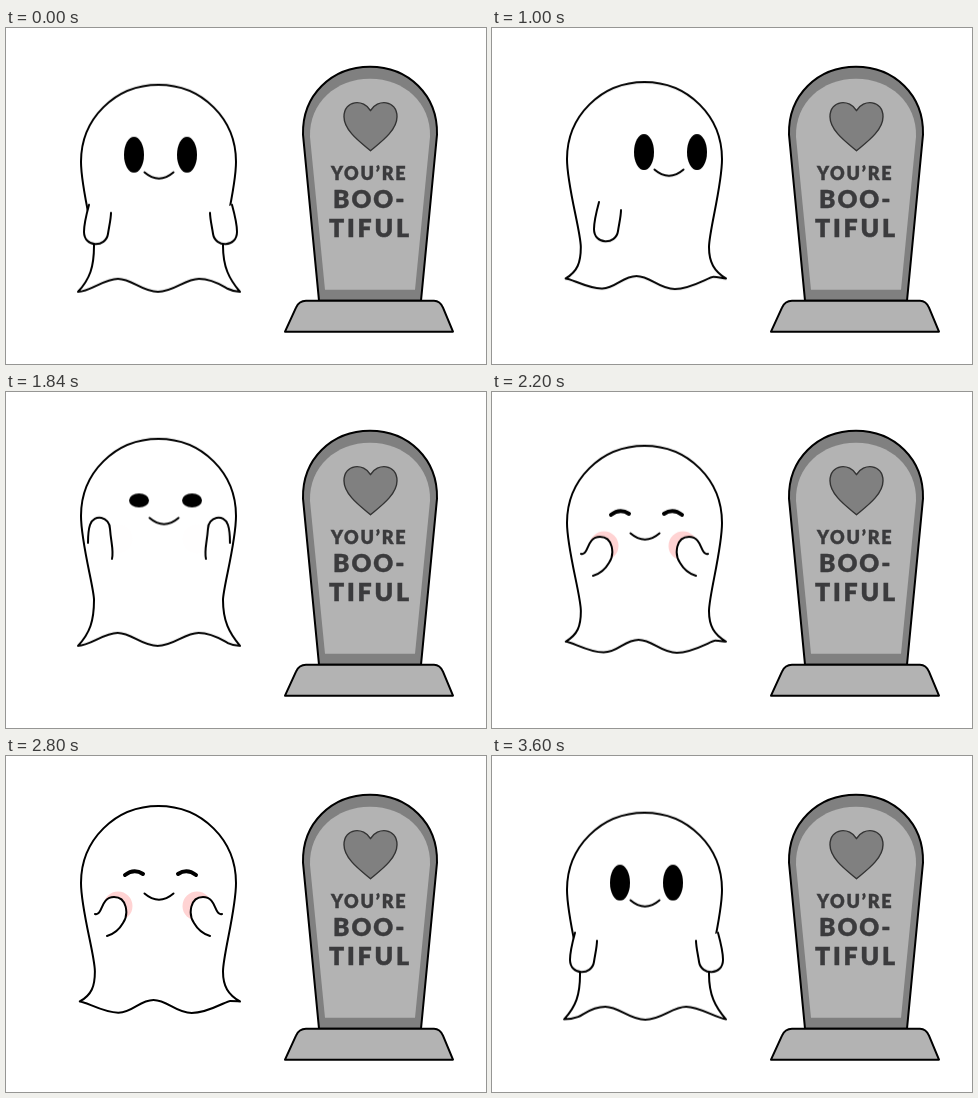
Write an HTML page without scripts that moves like this. It is 480 px wide and 336 px high and loops after 3.64 s.

```html
<!DOCTYPE html>
<html lang="en">
<head>
<meta charset="utf-8">
<title>Boo-tiful ghost</title>
<style>
  html, body { margin: 0; width: 100%; height: 100%; overflow: hidden; background: #fff; }
  svg { display: block; width: 480px; height: 336px; }
  .line { fill: none; stroke: #000; stroke-width: 2; stroke-linecap: round; }
  .skin { fill: #fff; stroke: #000; stroke-width: 2; stroke-linejoin: round; stroke-linecap: round; }
  .stone { stroke: #000; stroke-width: 2; stroke-linejoin: round; }
  text { font-family: Lato, sans-serif; font-weight: 900; fill: #3b3b3d; stroke: #3b3b3d; stroke-width: .4; }

  .ghost { animation: bob 1213.333ms infinite; }
  .body { animation: hem 606.667ms ease-in-out infinite; }
  .face, .left, .right, .arm, .eye, .open, .happy, .blush, .front, .back {
    animation-duration: 3640ms;
    animation-iteration-count: infinite;
    animation-timing-function: ease-in-out;
  }
  .face { animation-name: look; }
  .left { animation-name: left; }
  .right { animation-name: right; }
  .arm { animation-name: arm; }
  .eye { animation-name: blink; }
  .eye, .happy { transform-box: fill-box; transform-origin: center; }
  .open { animation-name: open; animation-timing-function: step-end; }
  .happy { animation-name: happy; animation-timing-function: step-end; stroke-width: 4; }
  .blush { animation-name: blush; }
  .front { animation-name: front; animation-timing-function: step-end; }
  .back { animation-name: back; animation-timing-function: step-end; }

  @keyframes bob {
    0%, 100% { transform: translateY(0); animation-timing-function: cubic-bezier(.37, 0, .63, 1); }
    50% { transform: translateY(-10px); animation-timing-function: cubic-bezier(.37, 0, .63, 1); }
  }

  /* The hem ripples leftwards; each half cycle hands its nodes on by one. */
  @keyframes hem {
    0% { d: path("M72 263C84 250 88 238 88 217C88 205 75 160 75 133C75 90 109 56 152.5 56S230 90 230 133C230 160 217 205 217 217C217 238 223 250 234 263C230 263 226 262 222 260S207 250 193 250S168 263 152 263S126 250 112 250S84 263 72 263Z"); }
    50% { d: path("M74 250C86 244 89 236 89 222C89 205 75 160 75 133C75 90 109 56 152.5 56S230 90 230 133C230 160 217 205 217 222C217 236 222 244 234 250C222 250 206 263 190 263S166 250 152 250S132 263 116 263S88 254 82 252S76 250 74 250Z"); }
    50.01% { d: path("M74 250C86 244 89 236 89 222C89 205 75 160 75 133C75 90 109 56 152.5 56S230 90 230 133C230 160 217 205 217 222C217 236 222 244 234 250C232 250 230 251 228 251S206 263 190 263S166 250 152 250S132 263 116 263S80 250 74 250Z"); }
    100% { d: path("M72 263C84 250 88 238 88 217C88 205 75 160 75 133C75 90 109 56 152.5 56S230 90 230 133C230 160 217 205 217 217C217 238 223 250 234 263C222 261 207 250 193 250S168 263 152 263S126 250 112 250S90 258 85 260S76 263 72 263Z"); }
  }

  @keyframes look {
    0%, 11% { transform: translate(0, 0); animation-timing-function: ease-in; }
    15.4% { transform: translate(12px, 5px); animation-timing-function: ease-out; }
    19.8%, 34% { transform: translate(24px, 0); }
    40.7%, 46.7% { transform: translate(12px, -20px); }
    53.8%, 100% { transform: translate(0, 0); }
  }
  @keyframes left {
    0%, 11% { transform: translate(0, 0); animation-timing-function: ease-in; }
    15.4% { transform: translate(11px, 4px); animation-timing-function: ease-out; }
    19.8%, 34% { transform: translate(24px, 0); }
    40.7%, 100% { transform: translate(0, 0); }
  }
  @keyframes right {
    0%, 11% { transform: translate(2px, 0); animation-timing-function: ease-in; }
    15.4% { transform: translate(-8px, 2px); animation-timing-function: ease-out; }
    19.8%, 34% { transform: translate(-30px, 0); }
    40.7%, 46% { transform: translate(0, 0); }
    55%, 78% { transform: translate(-2px, 0); }
    89%, 100% { transform: translate(2px, 0); }
  }
  /* down, half raised, spread, upright, on the cheeks and back */
  @keyframes arm {
    0%, 34%, 89%, 100% { d: path("M83 176C80 187 78 195 78 203C78 219 100 219 102 205C103 198 105 190 105 184"); }
    41.8%, 84.5% { d: path("M95 150C90 155 85 161 80 163C68 169 76 190 90 184C97 180 103 174 109 168"); }
    46% { d: path("M100 148C88 148 72 141 60 136C44 132 42 152 56 158C68 163 84 168 96 168"); }
    50.5%, 81% { d: path("M82 160C82 152 82 148 84 142C88 130 104 134 104 146C105 160 108 168 106 176"); }
    55%, 78% { d: path("M89 164C97 166 94 147 108 147C121 147 123 164 117 173C113 180 108 184 101 186"); }
  }

  @keyframes blink {
    0%, 13%, 17.8%, 49%, 83%, 100% { transform: scaleY(1); }
    14.6%, 16.2%, 51.5%, 80.5% { transform: scaleY(.15); }
  }
  @keyframes open {
    0%, 16.2%, 80.5%, 100% { opacity: 1; }
    14.6%, 51.5% { opacity: 0; }
  }
  @keyframes happy {
    0%, 16.2%, 80.5%, 100% { opacity: 0; transform: none; }
    14.6% { opacity: 1; transform: translateY(2px) scaleY(.7); }
    51.5% { opacity: 1; transform: none; }
  }
  @keyframes blush { 0%, 50%, 85%, 100% { opacity: 0; } 55%, 79% { opacity: 1; } }
  @keyframes front { 0%, 36%, 100% { opacity: 1; } 13% { opacity: 0; } }
  @keyframes back { 0%, 36%, 100% { opacity: 0; } 13% { opacity: 1; } }
</style>
</head>
<body>
<svg viewBox="0 0 480 336">
  <g class="stone" transform="translate(0 .7)">
    <path fill="#808080" d="M313 272L297 106C296 66 326 38 364 38S432 66 431 106L415 272Z"/>
    <path fill="#b3b3b3" stroke="none" d="M319 261L304 108C303 74 330 50 364 50S425 74 424 108L409 261Z"/>
    <path fill="#b3b3b3" d="M279 303L290 279Q293 272 300 272H428Q434 272 437 279L447 303Z"/>
    <path fill="#808080" stroke="#333" stroke-width="1.4" d="M364.5 122C355 114 338 102 338 88C338 71 358 70 364.5 82C371 70 391 71 391 88C391 102 374 114 364.5 122Z"/>
  </g>
  <text x="325" y="151.5" font-size="18" letter-spacing="1.8">YOU’RE</text>
  <text x="327" y="179.5" font-size="24.5" letter-spacing="2">BOO-</text>
  <text x="323" y="209" font-size="25" letter-spacing="2.8">TIFUL</text>

  <g transform="translate(0 .8)">
    <g class="ghost">
      <g class="back"><g class="right"><g transform="translate(307) scale(-1 1)"><path class="skin arm"/></g></g></g>
      <path class="skin body"/>
      <g class="blush" fill="#ffd3d3">
        <circle cx="112" cy="156" r="14.5"/>
        <circle cx="191" cy="156" r="14.5"/>
      </g>
      <g class="face">
        <g class="open">
          <ellipse class="eye" cx="128" cy="126" rx="10" ry="18"/>
          <ellipse class="eye" cx="181" cy="126" rx="10" ry="18"/>
        </g>
        <path class="line happy" d="M119 125Q128 118 137 124M172 124Q181 118 190 125"/>
        <path class="line" d="M138.5 143.5Q153 156 167.5 143.5"/>
      </g>
      <g class="left"><path class="skin arm"/></g>
      <g class="front"><g class="right"><g transform="translate(307) scale(-1 1)"><path class="skin arm"/></g></g></g>
    </g>
  </g>
</svg>
</body>
</html>
```
